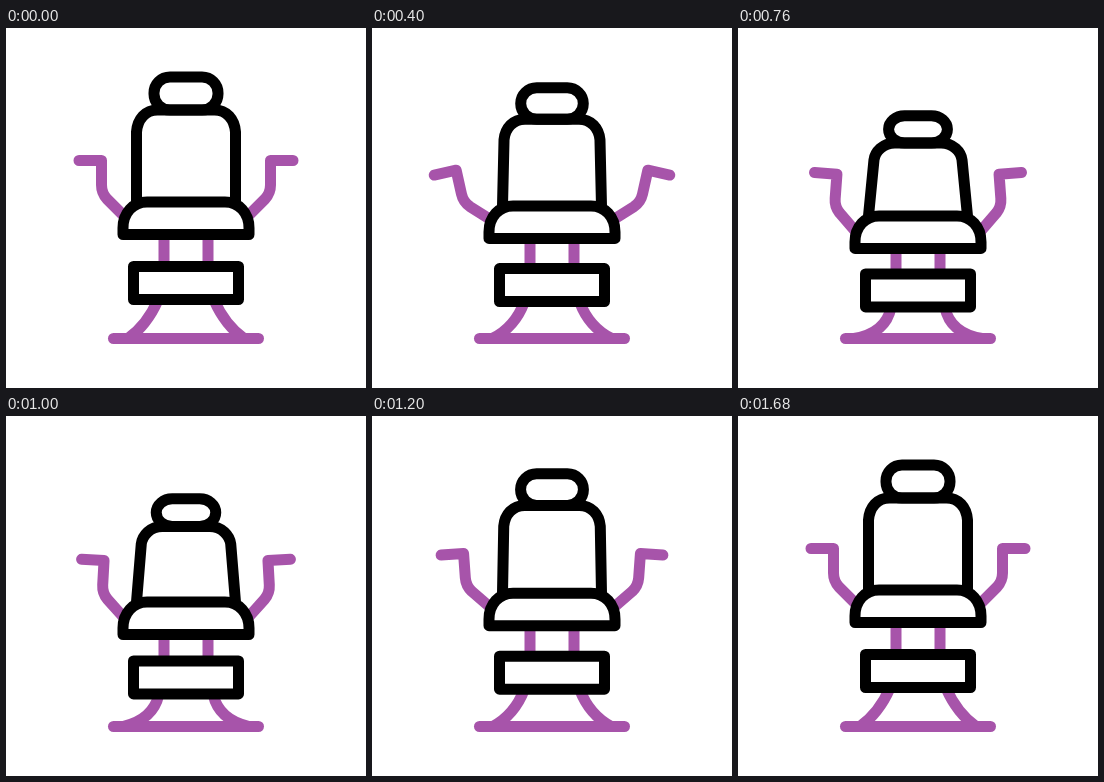
An HTML page for the animation above (1.8 s loop, 360 by 360 pixels).

```html
<!DOCTYPE html>
<html lang="en">
<head>
<meta charset="utf-8">
<title>Barber chair</title>
<style>
  html, body { margin: 0; width: 100%; height: 100%; overflow: hidden; background: #fff; }
  svg { display: block; width: 100%; height: 100%; }
  path, rect { fill: none; stroke: #000; stroke-width: 11; stroke-linecap: round; stroke-linejoin: round; }
  .accent path { stroke: #a754aa; }
  #seat, #foot { fill: #fff; }
</style>
</head>
<body>
<svg viewBox="0 0 360 360">
  <g class="accent">
    <g id="side">
      <path id="arm" d="M73 132.5H95.5V157Q95.5 165 101 171L118 188"/>
      <path id="post"/>
      <path id="leg"/>
    </g>
    <use href="#side" transform="matrix(-1 0 0 1 360 0)"/>
    <path d="M107.5 310.5H252.5"/>
  </g>
  <path id="back"/>
  <rect id="head" rx="16"/>
  <path id="seat" d="M117 206.5V200C117 185 127 174 141 174H219C233 174 243 185 243 200V206.5Z"/>
  <rect id="foot" x="127.5" y="238.5" width="105" height="33"/>
</svg>
<script>
const LOOP = 1800, STEP = 40;
const armKeys = [[120, 0], [420, -12.6], [860, 5], [1240, -4.2], [1680, 0]];

const part = id => document.getElementById(id);
const set = (id, attrs) => {
  for (const name in attrs) part(id).setAttribute(name, attrs[name]);
};

function ease(t, start, end) {
  const u = Math.min(1, Math.max(0, (t - start) / (end - start)));
  return u < 0.5 ? 4 * u ** 3 : 1 - 4 * (1 - u) ** 3;
}

function armAngle(t) {
  let angle = 0;
  for (let i = 1; i < armKeys.length; i++) {
    const [start, from] = armKeys[i - 1], [end, to] = armKeys[i];
    angle += (to - from) * ease(t, start, end);
  }
  return angle;
}

function draw(t) {
  const sink = ease(t, 100, 830) - ease(t, 780, 1460);
  const seatY = 14 * sink, footY = 7.5 * sink;
  const top = 82 + 33 * sink, shoulder = 104 + 28 * sink;
  const inset = 5.5 * sink, halfHead = 32 - 2.6 * sink;
  const left = 130.5 + inset, right = 229.5 - inset;

  set("arm", { transform: `translate(${-0.5 * sink} ${15 * sink}) rotate(${armAngle(t)} 115 186)` });
  set("post", { d: `M158 ${207 + seatY}V${239 + footY}` });
  set("leg", {
    d: `M${152 + sink} ${272 + footY}Q${141 + 7 * sink} ${297 + 8 * sink} ${122 - 6 * sink} 310.5`
  });
  set("back", {
    d: `M130.5 ${174 + seatY}L${left} ${shoulder}C${left + 1} ${top + 9} ${left + 9} ${top} ${left + 21} ${top}` +
       `H${right - 21}C${right - 9} ${top} ${right - 1} ${top + 9} ${right} ${shoulder}L229.5 ${174 + seatY}`
  });
  set("head", { x: 180 - halfHead, y: 49 + 39 * sink, width: 2 * halfHead, height: 33 - 6 * sink });
  set("seat", { transform: `translate(0 ${seatY})` });
  set("foot", { transform: `translate(0 ${footY})` });
}

const begin = performance.now();
function tick() {
  const t = (performance.now() - begin) % LOOP;
  draw(Math.floor(t / STEP) * STEP);
  requestAnimationFrame(tick);
}
tick();
</script>
</body>
</html>
```
